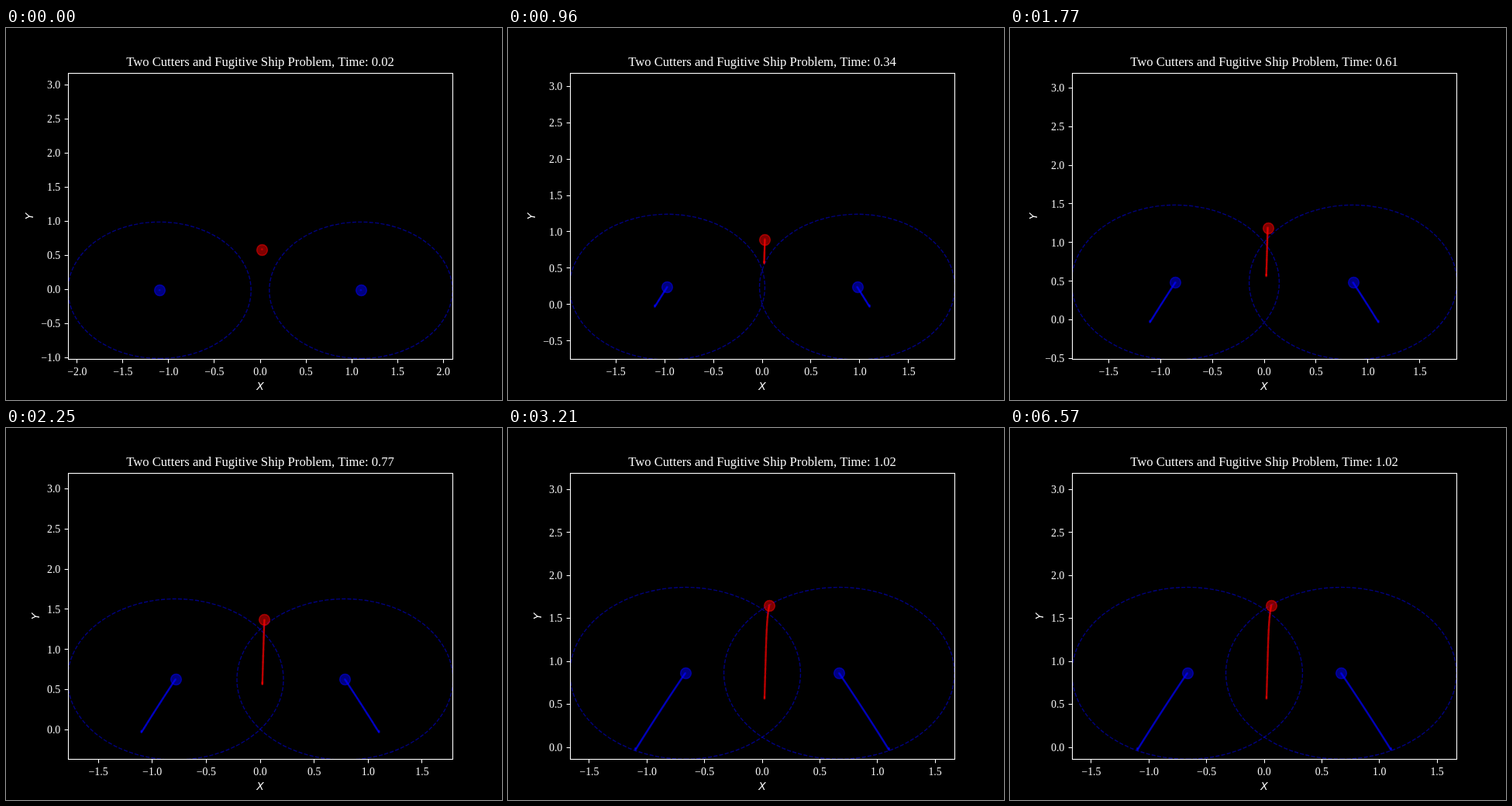
An HTML page with a canvas that plays this animation: 640x480 px, repeating every 7750 ms.

```html
<!DOCTYPE html>
<html lang="en">
<head>
<meta charset="utf-8">
<title>Pursuit problem</title>
<style>
  html, body { margin: 0; width: 100%; height: 100%; overflow: hidden; background: #000; }
  canvas { display: block; }
</style>
</head>
<body>
<canvas id="stage" width="640" height="480"></canvas>
<script>
const ctx = document.getElementById('stage').getContext('2d');
const LOOP = 7750, STEP = 30, LAST_STEP = 101;
const LEFT = 80, TOP = 57.6, WIDTH = 496, HEIGHT = 369.6;
const MID = LEFT + WIDTH / 2, BOTTOM = TOP + HEIGHT;
const SERIF = '"Liberation Serif", serif';
const RED = 'rgba(255,0,0,.5)', BLUE = 'rgba(0,0,255,.5)';

// Ships back off for three steps, then head upwards.
const backOff = n => Math.min(n + 1, 3) * 0.01;
const run = n => Math.max(n - 2, 0) * 0.01;

function cutter(n, side) {
  const s = run(n);
  return {
    x: side * (1.1 - 0.419 * s - 0.018 * s * s),
    y: -backOff(n) + 0.908 * s - 0.006 * s * s
  };
}

function fugitive(n) {
  const s = run(n);
  return { x: 0.02 + 0.024 * s + 0.02 * s ** 8, y: 0.6 + 1.1 * (s - backOff(n)) };
}

const ships = [
  { at: n => cutter(n, -1), color: BLUE, reach: 1 },
  { at: n => cutter(n, 1), color: BLUE, reach: 1 },
  { at: fugitive, color: RED, reach: 0 }
];

function makeView(n) {
  const edge = cutter(n, 1);
  const half = edge.x + 1, low = edge.y - 1;
  const sx = WIDTH / 2 / half, sy = HEIGHT / 2 / half;
  return {
    half, low, high: low + 2 * half, sx, sy,
    x: v => MID + v * sx,
    y: v => BOTTOM - (v - low) * sy
  };
}

function text(str, x, y, font, align = 'center') {
  ctx.font = font;
  ctx.textAlign = align;
  ctx.fillText(str, x, y);
}

function line(x1, y1, x2, y2) {
  ctx.beginPath();
  ctx.moveTo(x1, y1);
  ctx.lineTo(x2, y2);
  ctx.stroke();
}

function disc(x, y, r) {
  ctx.beginPath();
  ctx.arc(x, y, r, 0, 2 * Math.PI);
  ctx.fill();
}

function eachTick(low, high, draw) {
  for (let i = Math.ceil(low * 2); i <= high * 2; i++) {
    const v = i / 2;
    draw(v, (v < 0 ? '\u2212' : '') + Math.abs(v).toFixed(1));
  }
}

function drawShip(ship, n, view) {
  const p = ship.at(n), x = view.x(p.x), y = view.y(p.y);
  ctx.fillStyle = ctx.strokeStyle = ship.color;
  ctx.lineWidth = 1.39;
  if (ship.reach) {
    ctx.setLineDash([5.14, 2.22]);
    ctx.beginPath();
    ctx.ellipse(x, y, ship.reach * view.sx, ship.reach * view.sy, 0, Math.PI / 2, -1.5 * Math.PI, true);
    ctx.stroke();
    ctx.setLineDash([]);
  }
  for (let i = 0; i <= n; i++) {
    const q = ship.at(i);
    disc(view.x(q.x), view.y(q.y), 1.3);
  }
  disc(Math.round(x) + 0.5, Math.round(y) + 0.5, 6.94);
  ctx.stroke();
}

function drawAxes(view) {
  const tickFont = '13.89px ' + SERIF;
  const labelFont = 'italic 13.89px "DejaVu Sans", sans-serif';
  ctx.fillStyle = ctx.strokeStyle = '#fff';
  ctx.lineWidth = 1.1;
  ctx.strokeRect(LEFT + 0.5, 58.5, WIDTH, 369);

  eachTick(-view.half, view.half, (v, label) => {
    const x = Math.floor(view.x(v)) + 0.5;
    line(x, 428, x, 432.4);
    text(label, view.x(v), 448, tickFont);
  });
  eachTick(view.low, view.high, (v, label) => {
    const y = Math.floor(view.y(v)) + 0.5;
    line(75.6, y, 80, y);
    text(label, 70.3, Math.round(view.y(v) + 4.7), tickFont, 'right');
  });

  text('X', MID, 467, labelFont);
  ctx.save();
  ctx.translate(view.low <= -0.5 ? 35.2 : 43, 243);
  ctx.rotate(-Math.PI / 2);
  text('Y', 0, 0, labelFont);
  ctx.restore();
}

function render(now) {
  const k = Math.floor((now % LOOP) / STEP);
  const view = makeView(Math.min(k + 1, LAST_STEP));
  ctx.fillStyle = '#000';
  ctx.fillRect(0, 0, 640, 480);

  ctx.save();
  ctx.beginPath();
  ctx.rect(LEFT, TOP, WIDTH, HEIGHT);
  ctx.clip();
  for (const ship of ships) drawShip(ship, Math.min(k, LAST_STEP), view);
  ctx.restore();

  drawAxes(view);
  const time = Math.min(0.02 + k * 0.01, 1.02).toFixed(2);
  text('Two Cutters and Fugitive Ship Problem, Time: ' + time, MID, 49, '16.67px ' + SERIF);
}

const start = performance.now();
function tick() {
  render(performance.now() - start);
  requestAnimationFrame(tick);
}
tick();
</script>
</body>
</html>
```
